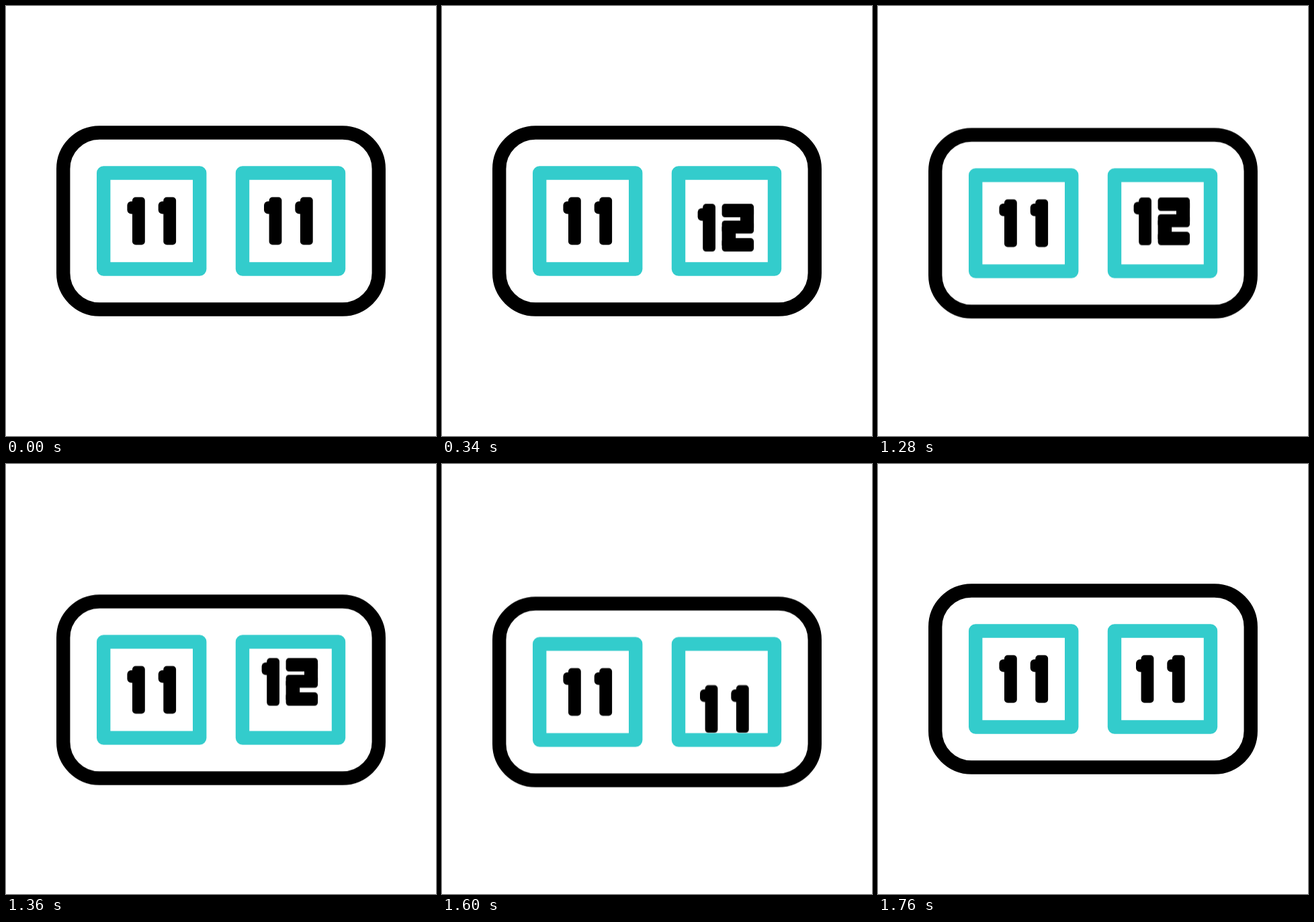
An HTML page for the animation above (2.4 s loop, 640x640 px).

```html
<!DOCTYPE html>
<html lang="en">
<head>
<meta charset="utf-8">
<title>Flip counter</title>
<style>
  html, body { margin: 0; width: 100%; height: 100%; overflow: hidden; background: #fff; }
  svg { display: block; width: 100%; height: 100%; }
  .case, .window { fill: none; stroke-width: 20.4; }
  .case { stroke: #000; }
  .window { stroke: #3cc; stroke-linejoin: round; }
  .counter { animation: press 2400ms infinite; }
  .tape { animation: roll 2400ms infinite; }

  /* The whole counter dips while the number rolls back. */
  @keyframes press {
    0% { transform: translateY(0); }
    52.5% { transform: translateY(0); animation-timing-function: cubic-bezier(.36, .48, .64, 1); }
    62.708% { transform: translateY(28.3px); animation-timing-function: cubic-bezier(.333, 0, .667, 1); }
    73.333%, 100% { transform: translateY(0); }
  }

  /* A strip of three numbers, 131px apart, moves up behind the window. */
  @keyframes roll {
    0% { transform: translateY(0); animation-timing-function: cubic-bezier(.3, .1, .3, 1); }
    21.667% { transform: translateY(-131px); }
    52.5% { transform: translateY(-131px); animation-timing-function: cubic-bezier(.47, 0, .53, 1); }
    73.333%, 100% { transform: translateY(-262px); }
  }
</style>
</head>
<body>
<svg viewBox="0 0 640 640" role="img" aria-label="Counter: 11 11, 11 12">
  <defs>
    <g id="one">
      <rect x="7.6" width="18.8" height="71" rx="5"/>
      <rect y="6.3" width="15" height="18.8" rx="6"/>
    </g>
    <g id="two">
      <rect width="47.5" height="20" rx="4.5"/>
      <rect y="24.8" width="47.5" height="19.4" rx="4.5"/>
      <rect y="51" width="47.5" height="20" rx="5"/>
      <rect x="27.4" y="8" width="20.1" height="28"/>
      <rect y="34" width="20.6" height="28"/>
    </g>
    <g id="eleven">
      <use href="#one"/>
      <use href="#one" x="46.3"/>
    </g>
    <g id="twelve">
      <use href="#one"/>
      <use href="#two" x="36"/>
    </g>
    <clipPath id="opening">
      <rect x="362" y="258.6" width="122.8" height="122.8"/>
    </clipPath>
  </defs>
  <g class="counter">
    <rect class="case" x="85.2" y="188.5" width="469.6" height="263" rx="54"/>
    <use href="#eleven" x="180.4" y="284.5"/>
    <g clip-path="url(#opening)">
      <g class="tape">
        <use href="#eleven" x="384" y="284.5"/>
        <use href="#twelve" x="380.6" y="413.1"/>
        <use href="#eleven" x="384" y="546.5"/>
      </g>
    </g>
    <rect class="window" x="145.2" y="248.5" width="143" height="143"/>
    <rect class="window" x="352" y="248.5" width="143" height="143"/>
  </g>
</svg>
</body>
</html>
```
